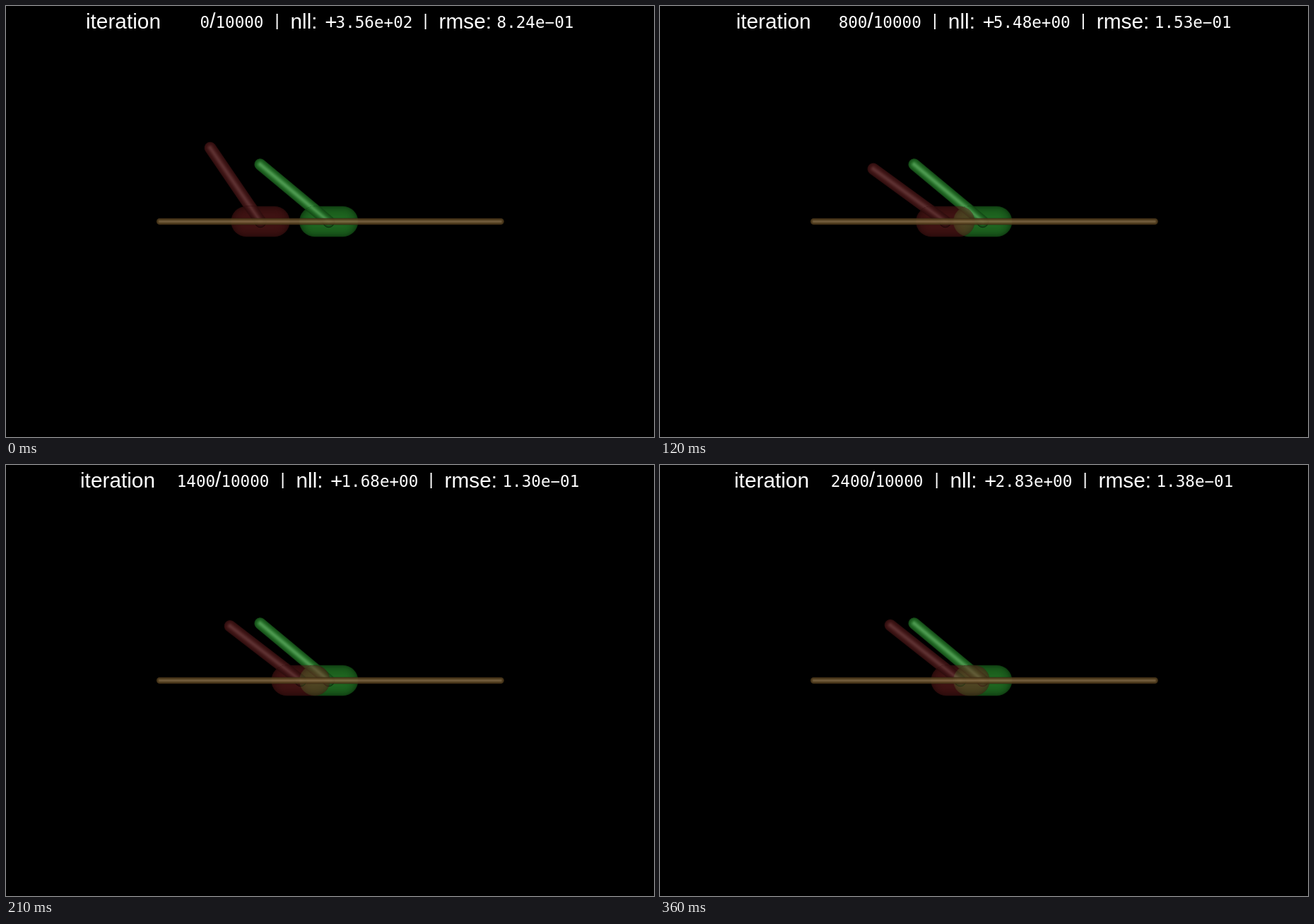
Animation of 917 by 611 pixels, one loop 1390 ms. Source, as an HTML page with a canvas:

```html
<!DOCTYPE html>
<html lang="en">
<head>
<meta charset="utf-8">
<title>Cart-pole fit</title>
<style>
  html, body { margin: 0; width: 100%; height: 100%; overflow: hidden; background: #000; }
  canvas { display: block; }
</style>
</head>
<body>
<canvas id="stage" width="917" height="611"></canvas>
<script>
const W = 917, H = 611, LOOP = 1390, STEP = 30, LAST = 12;
const AXIS = 305.5, POLE = 126.3;
const LABEL = '29.8px "Liberation Sans", Arial, sans-serif';
const BAR = '24px "Liberation Sans", Arial, sans-serif';
const DIGIT = '22.6px "DejaVu Sans Mono", monospace';

const ctx = document.getElementById('stage').getContext('2d');
const layer = document.createElement('canvas');
layer.width = W;
layer.height = H;
const lc = layer.getContext('2d');

// step, cart x, pole tip offset, nll, rmse
const KEYS = [
  [0, 360, -71, 356, 0.824],
  [1, 412.5, -100.3, -0.571, 0.112],
  [2, 403, -101.8, 5.08, 0.151],
  [5, 404.2, -102, 5.68, 0.154],
  [7, 417, -100, 1.68, 0.130],
  [10, 419.5, -100.3, 4.36, 0.148],
  [12, 425, -99, 2.83, 0.138]
];

// edge colour, middle colour and highlight of each rounded bar
const GREEN = {
  cart: [[12, 52, 14], [31, 104, 33], 0],
  pole: [[14, 56, 17], [36, 112, 39], 42]
};
const RED = {
  cart: [[70, 18, 18], [130, 38, 38], 0],
  pole: [[76, 20, 21], [134, 46, 47], 52]
};
const RAIL = [[50, 37, 17], [98, 74, 37], 36];

function sample(step) {
  const i = Math.max(1, KEYS.findIndex(k => k[0] >= step));
  const a = KEYS[i - 1], b = KEYS[i];
  const f = (step - a[0]) / (b[0] - a[0]);
  return a.map((v, j) => v + (b[j] - v) * f);
}

// Nested strokes shade the bar like a lit cylinder with round ends.
function capsule(c, x1, y1, x2, y2, r, [edge, mid, shine]) {
  c.lineCap = 'round';
  const n = Math.ceil(r * 2);
  for (let i = 0; i < n; i++) {
    const u = 1 - i / n;
    const k = Math.sqrt(1 - u * u);
    const glow = shine * k ** 12;
    c.strokeStyle = `rgb(${edge.map((e, j) => Math.round(e + (mid[j] - e) * k + glow))})`;
    c.lineWidth = 2 * r * u;
    c.beginPath();
    c.moveTo(x1, y1);
    c.lineTo(x2, y2);
    c.stroke();
  }
}

function robot(x, dx, look, alpha) {
  const tipY = AXIS - Math.sqrt(POLE * POLE - dx * dx);
  const pole = () => capsule(lc, x, AXIS, x + dx, tipY, 8.4, look.pole);
  lc.clearRect(0, 0, W, H);
  pole();
  capsule(lc, x - 20, AXIS, x + 20, AXIS, 21.7, look.cart);

  // the pole stays faintly visible in front of the cart
  lc.save();
  lc.beginPath();
  lc.roundRect(x - 41.7, AXIS - 21.7, 83.4, 43.4, 21.7);
  lc.clip();
  lc.globalAlpha = 0.5;
  pole();
  lc.strokeStyle = '#000';
  lc.lineWidth = 1;
  lc.beginPath();
  lc.arc(x, AXIS, 8.3, 0, Math.PI);
  lc.stroke();
  lc.restore();
  blit(alpha);
}

function blit(alpha) {
  ctx.globalAlpha = alpha;
  ctx.drawImage(layer, 0, 0);
  ctx.globalAlpha = 1;
}

function rail() {
  lc.clearRect(0, 0, W, H);
  capsule(lc, 217.5, AXIS, 700.2, AXIS, 4.7, RAIL);
  blit(0.88);
}

function text(s, x, y, font, align = 'left') {
  ctx.font = font;
  ctx.textAlign = align;
  ctx.fillText(s, x, y);
  return ctx.measureText(s).width;
}

function scientific(v) {
  const [m, e] = Math.abs(v).toExponential(2).split('e');
  const sign = e[0] === '-' ? '\u2212' : '+';
  return m + 'e' + sign + e.slice(1).padStart(2, '0');
}

function caption(step, nll, rmse) {
  const count = String(step * 200);
  const pad = 4 - count.length;
  const left = 106.5 + 2.65 * pad + (nll < 0 ? 4.2 : 0);
  const right = W - left;
  const bar = left + 285 - 5.3 * pad;
  ctx.fillStyle = '#fff';
  text('iteration', left - 1.5, 31.5, LABEL);
  let x = left + 135.2 + 8.3 * pad;
  x += text(count, x, 31, DIGIT);
  x += text('/', x, 31, LABEL);
  text('10000', x, 31, DIGIT);
  text('|', bar, 28, BAR, 'center');
  text('nll:', bar + 19, 31.5, LABEL);
  text(nll < 0 ? '-' : '+', right - 334, 32.5, LABEL, 'right');
  text(scientific(nll), right - 336, 31, DIGIT);
  text('|', right - 209, 28, BAR, 'center');
  text('rmse:', right - 190, 31.5, LABEL);
  text(scientific(rmse), right - 108, 31, DIGIT);
}

function draw() {
  const step = Math.min(LAST, Math.floor(performance.now() % LOOP / STEP));
  const [, x, dx, nll, rmse] = sample(step);
  ctx.fillStyle = '#000';
  ctx.fillRect(0, 0, W, H);
  robot(456.7, -97, GREEN, 1);
  robot(x, dx, RED, 0.5);
  rail();
  caption(step, nll, rmse);
  requestAnimationFrame(draw);
}
draw();
</script>
</body>
</html>
```
